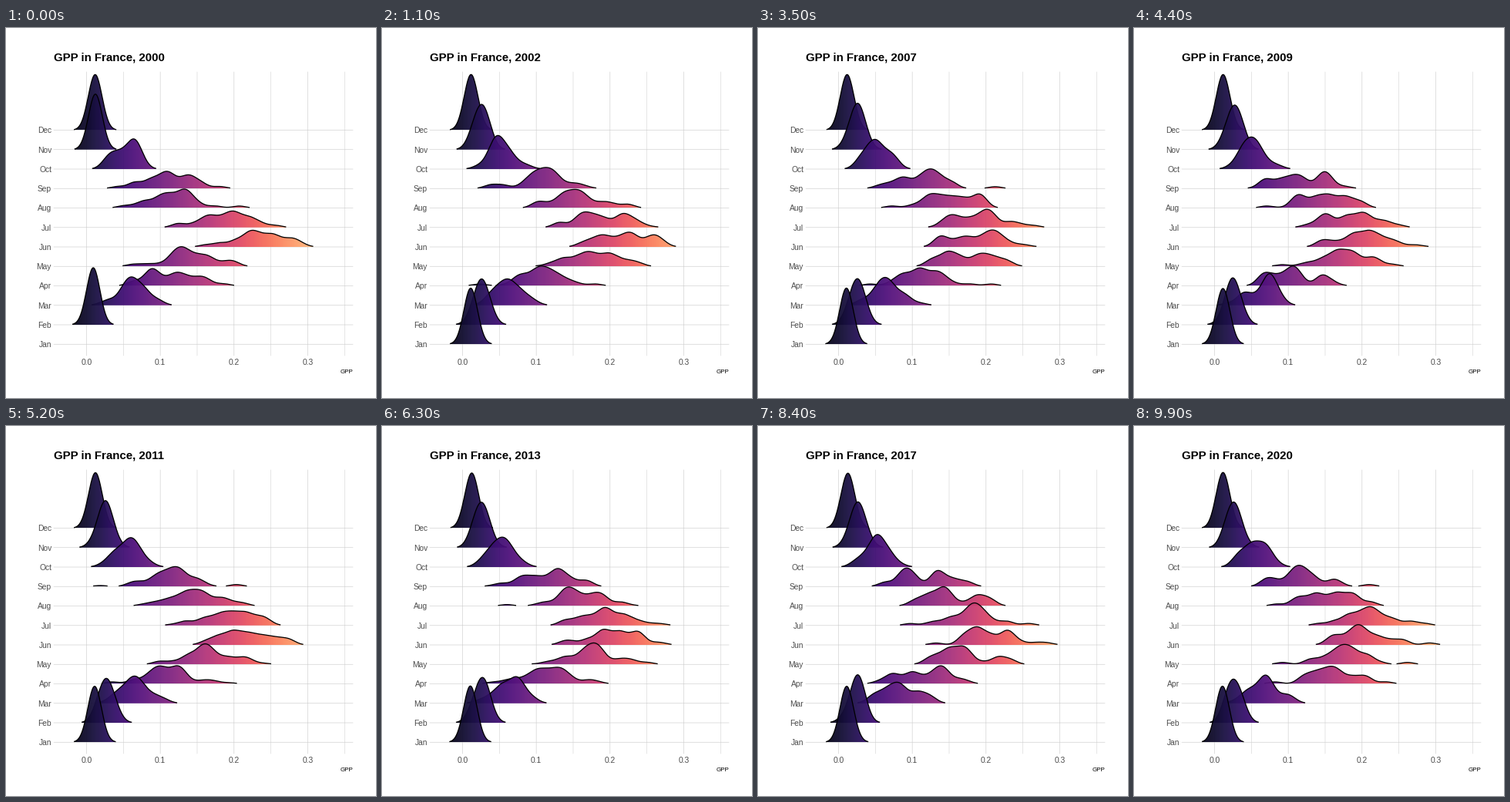
A matplotlib script for the animation above (10 s loop, 480 px wide and 480 px high).

```python
import numpy as np
import matplotlib.pyplot as plt
from matplotlib.animation import FuncAnimation
from matplotlib.path import Path

FRAMES, INTERVAL = 100, 100
FIRST, LAST = 2000, 2020
DAYS = 30
MONTHS = "Dec Nov Oct Sep Aug Jul Jun May Apr Mar Feb Jan".split()
CLIMATE = [12, 26, 54, 112, 153, 188, 212, 172, 111, 64, 26, 11]  # GPP / 1000

# Months far from their usual mean.
STANDOUT = {
    (2000, "May"): -32, (2000, "Jun"): 23, (2000, "Aug"): -35,
    (2000, "Nov"): -14, (2000, "Feb"): -17, (2005, "Apr"): -33,
    (2007, "Jun"): -27, (2015, "Jul"): -23, (2017, "Mar"): 20,
    (2020, "Apr"): 49, (2020, "Jul"): 22,
}

BW = 8.8          # kernel width, in thousandths
TALLEST = 77      # height of a month of equal days, in pixels
CUT = 0.75        # lowest height that is drawn
PT = 0.72         # points per pixel at 100 dpi
X = np.arange(-45, 370, 0.75)


def px(v):
    return 104.5 + 0.9565 * v


def base(row):
    return 132.5 + 25.25 * row


def ridge(days):
    """Kernel density of the daily values, as pixel heights."""
    z = (X[:, None] - days) / BW
    return TALLEST * np.exp(-0.5 * z ** 2).mean(axis=1)


def simulate():
    """Density of every month and year from seeded daily values."""
    rng = np.random.default_rng(12)
    years = []
    for year in range(FIRST, LAST + 1):
        rows = []
        for month, usual in zip(MONTHS, CLIMATE):
            sway = 0.06 * usual * rng.uniform(-1, 1)
            mean = usual + STANDOUT.get((year, month), sway)
            noise = rng.normal(size=DAYS)
            noise = (noise - noise.mean()) / noise.std()
            rows.append(ridge(mean + min(0.28 * mean, 32) * noise))
        years.append(rows)
    return np.array(years)


YEARS = simulate()
YEARS[0, -1] = YEARS[1, -1]


def heights(f):
    """Ridges at a frame: a linear mix of the two nearest years."""
    t = (LAST - FIRST) * f / (FRAMES - 1)
    k = min(int(t), LAST - FIRST - 1)
    h = YEARS[k] + (t - k) * (YEARS[k + 1] - YEARS[k])
    if t < 1:
        h[-1] = 0            # records start in February
    return np.where(h < CUT, 0, h)


def outline(h, row):
    y = base(row)
    xs = np.concatenate([px(X), px(X[[-1, 0]])])
    ys = np.concatenate([y - h, [y, y]])
    return Path(np.column_stack([xs, ys]))


HEIGHTS = [heights(f) for f in range(FRAMES)]
PATHS = [[outline(h, r) for r, h in enumerate(hs)] for hs in HEIGHTS]

fig = plt.figure(figsize=(4.8, 4.8), dpi=100, facecolor="white")
ax = fig.add_axes([0, 0, 1, 1])
ax.axis("off")


def label(x, y, text, size, **kw):
    return ax.text(x, y, text, fontsize=size * PT, family="Liberation Sans",
                   va="baseline", **kw)


def rule(xs, ys, width):
    ax.plot(xs, ys, color="#cccccc", lw=width * PT, snap=False, zorder=0)


for i in range(8):
    x = px(50 * i)
    rule([x, x], [57, 425], 0.5 if i % 2 else 0.6)
    if i % 2 == 0:
        label(x, 437.3, f"{i * 0.05:.1f}", 10.3, ha="center", color="#4d4d4d")
for r, name in enumerate(MONTHS):
    rule([62, 450], [base(r)] * 2, 0.6)
    label(59, base(r) + 3.8, name, 10.3, ha="right", color="#4d4d4d")
label(450, 448.5, "GPP", 8, ha="right", color="black")
title = label(62, 42.4, "", 15, weight="bold", color="black")

shades = plt.get_cmap("magma")((X + 35) / 400)[None]
shades[..., 3] = 0.95
fills, lines = [], []
for r in range(len(MONTHS)):
    y = base(r)
    fills.append(ax.imshow(shades, extent=(px(X[0]), px(X[-1]), y, y - 85),
                           aspect="auto", interpolation="bilinear",
                           zorder=2 + r))
    lines += ax.plot([], [], color="black", lw=1.3 * PT, zorder=2.5 + r)
ax.set_xlim(0, 480)
ax.set_ylim(480, 0)


def draw(f):
    year = round(FIRST + (LAST - FIRST) * f / (FRAMES - 1))
    title.set_text(f"GPP in France, {year}")
    for r, (fill, line) in enumerate(zip(fills, lines)):
        h = HEIGHTS[f][r]
        fill.set_visible(bool(h.any()))
        fill.set_clip_path(PATHS[f][r], ax.transData)
        line.set_data(px(X), np.where(h > 0, base(r) - h, np.nan))
    return [title, *fills, *lines]


anim = FuncAnimation(fig, draw, frames=FRAMES, interval=INTERVAL,
                     init_func=lambda: draw(0), repeat=True, repeat_delay=0)
plt.show()
```
